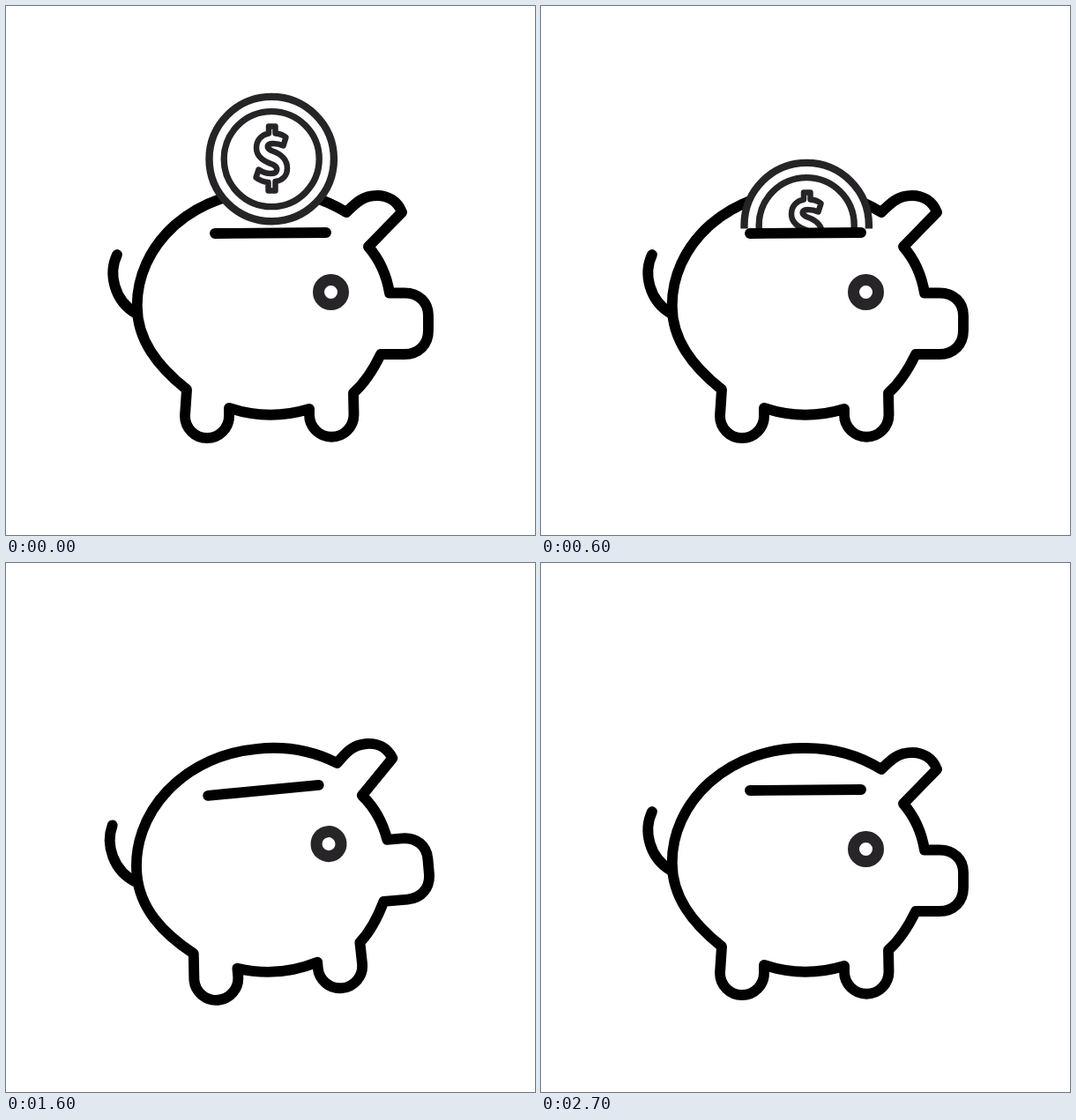
An HTML page that plays this animation: 600x600 px, repeating every 2.9 s.

```html
<!DOCTYPE html>
<html lang="en">
<head>
<meta charset="utf-8">
<title>Piggy bank</title>
<style>
  html, body { margin: 0; width: 100%; height: 100%; overflow: hidden; background: #fff; }
  svg { display: block; width: 100%; height: 100%; }
  .line { fill: #fff; stroke: #000; stroke-width: 11.9; stroke-linecap: round; stroke-linejoin: round; }
  #coin { fill: #fff; stroke: #262427; stroke-width: 7.4; stroke-linejoin: round; }
</style>
</head>
<body>
<svg viewBox="0 0 600 600">
  <clipPath id="aboveSlot"><rect width="600" height="252.5"/></clipPath>
  <g id="pig">
    <path class="line" d="M126 282C116 303 122 334 148 349"/>
    <path class="line" d="M386 234A148 130 0 0 0 297 210A148.300 130 0 0 0 148.700 340
      C148.700 378 171 408 205 435L203 465A25 25 0 0 0 253 465V456
      Q298 471 344 457V463.500A25 25 0 0 0 394.500 463.500L394 439Q411 424 425 395
      H452C468 395 479 384 479 368V351C479 336 468 325.500 452 325.500H435
      Q430 295 411 273L449 234C444 221 433 215 421 215C405 215 397 223 386 234Z"/>
    <g clip-path="url(#aboveSlot)">
      <g id="coin">
        <circle cx="301.200" cy="173.600" r="70.700" stroke-width="8.400"/>
        <circle cx="301.200" cy="173.600" r="54"/>
        <path stroke-width="6.500" d="M298 136.500H305.500V144.500Q313 145 317.500 149L314.500 158.500Q309 156 303 156
          C295 156 295 161 301 164C313 168 319 174 319 184C319 193 313 198 305.500 199
          V209.500H297.500V200Q289 199 283.500 194.500L286.500 185.500Q293 190 300 190
          C309 190 309 183 303 180C292 176 284 171 284 161C284 152 290 146 298 144.500Z"/>
      </g>
    </g>
    <path class="line" d="M237 258L363 257"/>
    <g id="eye">
      <circle r="14" fill="#fff" stroke="#272528" stroke-width="13"/>
    </g>
  </g>
</svg>
<script>
  const LOOP = 2900, STEP = 100;
  const [pig, coin, eye] = ['pig', 'coin', 'eye'].map(id => document.getElementById(id));

  // Each key is [time in ms, value].
  const drop = [[0, 0], [200, 24], [600, 75], [1000, 121], [1200, 140], [1400, 154]];
  const tilt = [[1500, 0], [1700, -10], [1900, 10], [2100, 0]];
  const blink = [[2100, 1], [2400, 0.1], [2700, 1]];

  function valueAt(keys, time) {
    const next = keys.findIndex(key => key[0] > time);
    if (next === 0) return keys[0][1];
    if (next < 0) return keys[keys.length - 1][1];
    const [t0, v0] = keys[next - 1], [t1, v1] = keys[next];
    return v0 + (v1 - v0) * (time - t0) / (t1 - t0);
  }

  const start = performance.now();

  function draw() {
    const elapsed = (performance.now() - start) % LOOP;
    const time = Math.floor(elapsed / STEP) * STEP;
    coin.setAttribute('transform', `translate(0 ${valueAt(drop, time)})`);
    coin.setAttribute('visibility', time < 1400 ? 'visible' : 'hidden');
    pig.setAttribute('transform', `rotate(${valueAt(tilt, time)} 300 350)`);
    eye.setAttribute('transform', `translate(368.5 324.5) scale(1 ${valueAt(blink, time)})`);
    requestAnimationFrame(draw);
  }
  draw();
</script>
</body>
</html>
```
